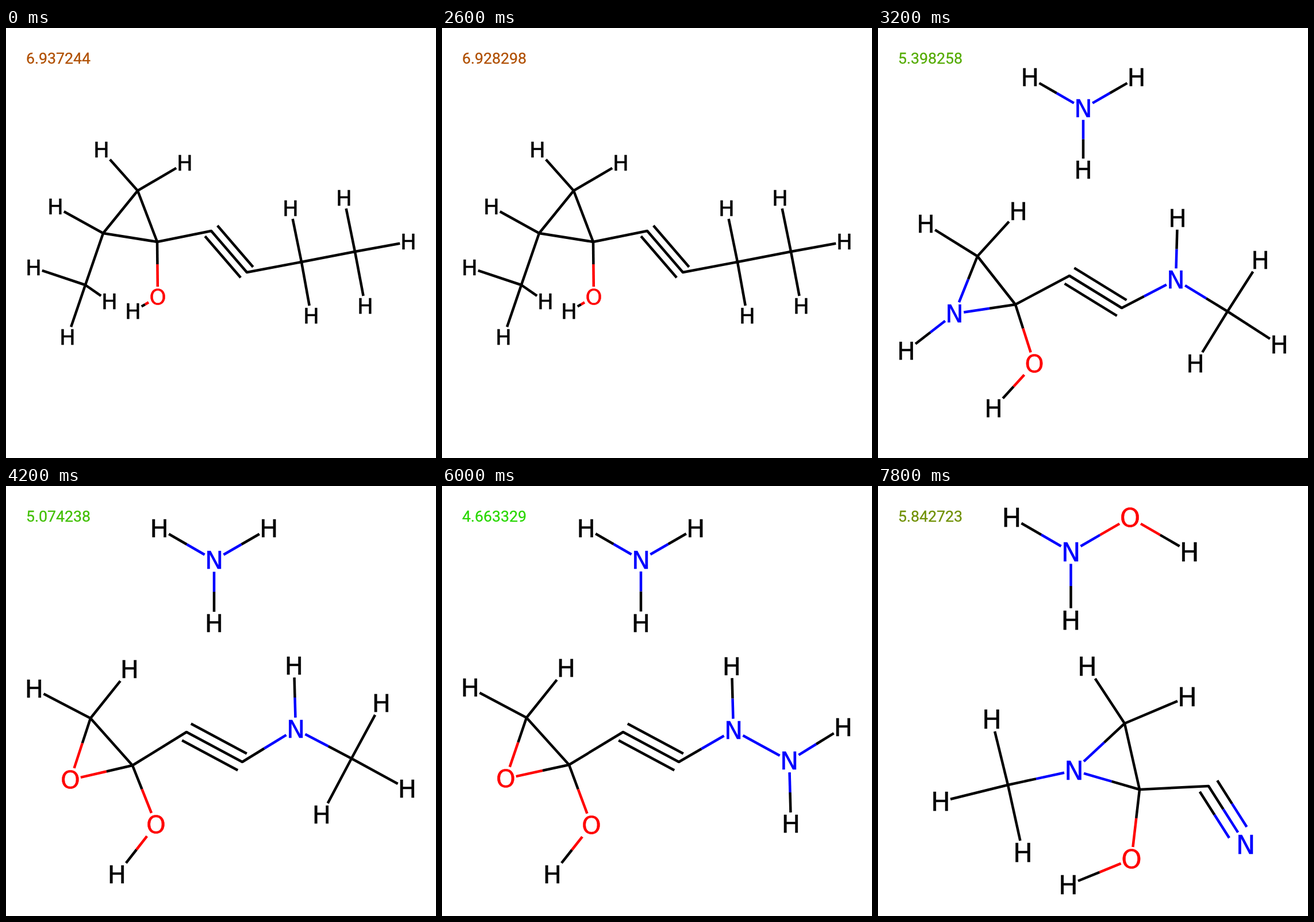
Recreate the animation shown at these times as an HTML page. Size 748 px wide and 748 px high, loop 8 s.

```html
<!DOCTYPE html>
<html lang="en">
<head>
<meta charset="utf-8">
<title>Molecule search</title>
<style>
  html, body { margin: 0; width: 100%; height: 100%; overflow: hidden; background: #fff; }
  svg { display: block; width: 100%; height: 100%; }
  .score { font: 26.7px Roboto, sans-serif; stroke-width: 0.3; }
  .atom { font-family: "DejaVu Sans", sans-serif; text-anchor: middle; stroke-width: 0.5; }
  line { stroke-width: 4.5; }
</style>
</head>
<body>
<svg id="stage" viewBox="0 0 748 748"></svg>
<script>
const LOOP = 8000, STEP = 200;
const COLORS = { H: '#000', C: '#000', N: '#00f', O: '#f00' };
const HALF_WIDTH = { H: 0.278, N: 0.278, O: 0.31 };
const HALF_CAP = 0.3645, PAD = 4.5;

// Trigonal nitrogen with bond length r; its right arm may carry a hydroxyl group.
function amine(x, y, r, hydroxyl) {
  const dx = r * 0.866, up = y - r / 2;
  const atoms = [['N', x, y], ['H', x - dx, up, 0], ['H', x, y + r, 0],
    [hydroxyl ? 'O' : 'H', x + dx, up, 0]];
  if (hydroxyl) atoms.push(['H', x + 2 * dx, y, 3]);
  return { atoms };
}

// Atom: [element, x, y, parent, bond order]. The first three atoms form a ring.
const scenes = [
  { start: 0, size: 37, parts: [{ ring: true, atoms: [
    ['C', 229, 283], ['C', 169, 357, 0], ['C', 263, 372, 1],
    ['H', 166, 212, 0], ['H', 311, 235, 0], ['H', 86, 311, 1],
    ['C', 138, 447, 1], ['H', 48, 417, 6], ['H', 180, 476, 6], ['H', 107, 538, 6],
    ['O', 264, 468, 2], ['H', 221, 493, 10],
    ['C', 357, 353, 2], ['C', 419, 425, 12, 3], ['C', 514, 407, 13],
    ['H', 495, 314, 14], ['H', 531, 501, 14], ['C', 607, 389, 14],
    ['H', 588, 296, 17], ['H', 700, 372, 17], ['H', 625, 484, 17]] }] },
  { start: 3000, size: 42, parts: [amine(357, 140, 107), { ring: true, atoms: [
    ['C', 173, 397], ['N', 133, 497, 0], ['C', 239, 481, 1],
    ['H', 83, 341, 0], ['H', 244, 319, 0], ['H', 49, 562, 1],
    ['O', 272, 584, 2], ['H', 201, 662, 6],
    ['C', 333, 431, 2], ['C', 424, 487, 8, 3], ['N', 518, 438, 9],
    ['H', 521, 331, 10], ['C', 608, 493, 10],
    ['H', 665, 404, 12], ['H', 698, 551, 12], ['H', 552, 584, 12]] }] },
  { start: 3800, size: 43, parts: [amine(362, 129, 110), { ring: true, atoms: [
    ['C', 147, 404], ['O', 112, 511, 0], ['C', 220, 486, 1],
    ['H', 49, 353, 0], ['H', 215, 319, 0],
    ['O', 261, 589, 2], ['H', 193, 676, 5],
    ['C', 314, 428, 2], ['C', 411, 480, 7, 3], ['N', 504, 423, 8],
    ['H', 501, 313, 9], ['C', 601, 474, 9],
    ['H', 653, 378, 11], ['H', 698, 527, 11], ['H', 549, 572, 11]] }] },
  { start: 5200, size: 43, parts: [amine(346, 128.5, 110), { ring: true, atoms: [
    ['C', 147, 403], ['O', 111, 509, 0], ['C', 221, 485, 1],
    ['H', 49, 351, 0], ['H', 216, 317, 0],
    ['O', 260, 590, 2], ['H', 192, 676, 5],
    ['C', 315, 428, 2], ['C', 412, 480, 7, 3], ['N', 507, 425, 8],
    ['H', 504, 314, 9], ['N', 604, 478, 9],
    ['H', 698, 420, 11], ['H', 607, 588, 11]] }] },
  { start: 6600, size: 45, parts: [amine(165, 150, 118, true), amine(595.5, 501, 118), { ring: true, atoms: [
    ['C', 189, 495], ['O', 243, 392, 0], ['C', 306, 490, 1],
    ['O', 76, 462, 0], ['H', 50, 347, 3],
    ['C', 174, 612, 0], ['N', 65, 658, 5, 3],
    ['H', 415, 445, 2], ['H', 332, 605, 2]] }] },
  { start: 7200, size: 45, parts: [amine(335.5, 114.5, 119, true), { ring: true, atoms: [
    ['N', 341, 495], ['C', 429, 413, 0], ['C', 455, 528, 1],
    ['H', 364, 314, 1], ['H', 538, 367, 1],
    ['C', 226, 520, 0], ['H', 198, 406, 5], ['H', 109, 549, 5], ['H', 252, 638, 5],
    ['O', 441, 649, 2], ['H', 331, 694, 9],
    ['C', 575, 522, 2], ['N', 639.5, 623.5, 11, 3]] }] },
];

const scores = [[0, 6.937244], [2600, 6.928298], [3200, 5.398258], [4200, 5.074238],
  [6000, 4.663329], [7000, 5.028031], [7200, 5.846915], [7800, 5.842723]];

function add(parent, tag, attrs, text = '') {
  const el = document.createElementNS('http://www.w3.org/2000/svg', tag);
  for (const key in attrs) el.setAttribute(key, attrs[key]);
  el.textContent = text;
  return parent.appendChild(el);
}

// Point where the bond from one atom to another leaves the label box.
function bondEnd([element, x, y], [, tx, ty], size) {
  if (element === 'C') return [x, y];
  const dx = tx - x, dy = ty - y;
  const k = Math.min((HALF_WIDTH[element] * size + PAD) / Math.abs(dx),
    (HALF_CAP * size + PAD) / Math.abs(dy));
  return [x + dx * k, y + dy * k];
}

function drawBond(group, a, b, order, size) {
  const [x1, y1] = bondEnd(a, b, size), [x2, y2] = bondEnd(b, a, size);
  const mx = (x1 + x2) / 2, my = (y1 + y2) / 2;
  const offsets = order === 3 ? [-0.15, 0, 0.15] : [0];
  for (const offset of offsets) {
    const ox = (b[2] - a[2]) * offset, oy = (a[1] - b[1]) * offset;
    const stroke = (xa, ya, xb, yb, color) => add(group, 'line',
      { x1: xa + ox, y1: ya + oy, x2: xb + ox, y2: yb + oy, stroke: color });
    if (COLORS[a[0]] === COLORS[b[0]]) {
      stroke(x1, y1, x2, y2, COLORS[a[0]]);
    } else {
      stroke(x1, y1, mx, my, COLORS[a[0]]);
      stroke(mx, my, x2, y2, COLORS[b[0]]);
    }
  }
}

function drawPart(group, { atoms, ring }, size) {
  for (const atom of atoms) {
    if (atom[3] !== undefined) drawBond(group, atoms[atom[3]], atom, atom[4], size);
  }
  if (ring) drawBond(group, atoms[0], atoms[2], 1, size);
  for (const [element, x, y] of atoms) {
    const color = COLORS[element];
    if (element === 'C') add(group, 'circle', { cx: x, cy: y, r: 2.25 });
    else add(group, 'text', { class: 'atom', x, y: y + HALF_CAP * size - 0.4,
      'font-size': size, fill: color, stroke: color }, element);
  }
}

const stage = document.getElementById('stage');
for (const scene of scenes) {
  scene.group = add(stage, 'g', { display: 'none' });
  scene.parts.forEach(part => drawPart(scene.group, part, scene.size));
}
const label = add(stage, 'text', { class: 'score', x: 35, y: 62 });

function scoreAt(t) {
  const i = scores.findLastIndex(([time]) => time <= t);
  const [t0, v0] = scores[i], [t1, v1] = scores[i + 1] || [LOOP, v0];
  return v0 + (v1 - v0) * (t - t0) / (t1 - t0);
}

function render() {
  const t = Math.floor(performance.now() % LOOP / STEP) * STEP;
  const current = scenes.findLast(scene => scene.start <= t);
  for (const scene of scenes) {
    scene.group.setAttribute('display', scene === current ? 'inline' : 'none');
  }
  const score = scoreAt(t), red = Math.round((score - 4) * 60);
  const color = `rgb(${red}, ${255 - red}, 0)`;
  label.textContent = score.toFixed(6);
  label.setAttribute('fill', color);
  label.setAttribute('stroke', color);
  requestAnimationFrame(render);
}
render();
</script>
</body>
</html>
```
